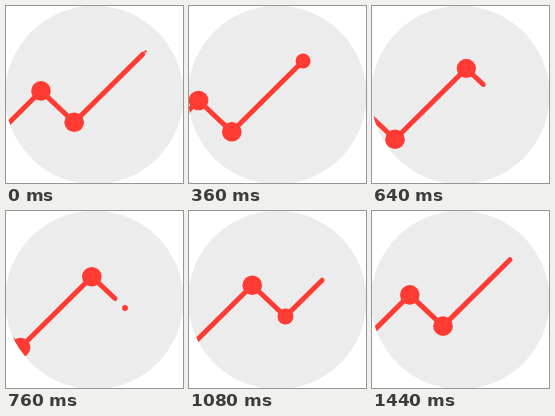
Recreate the animation shown at these times as an HTML page with a canvas. Size 177 by 177 pixels, loop 1480 ms.

```html
<!DOCTYPE html>
<html lang="en">
<head>
<meta charset="utf-8">
<title>Rolling line chart</title>
<style>
  html, body { margin: 0; width: 100%; height: 100%; overflow: hidden; background: #fff; }
  canvas { display: block; width: 177px; height: 177px; }
</style>
</head>
<body>
<canvas id="stage"></canvas>
<script>
const SIZE = 177, LOOP = 1480, STEP = 40, GROW = 800;
const PERIOD = { x: 104.5, y: -39.5 };   // from one peak to the next
const PEAK = { x: 139.5, y: 45.4 };      // newest peak when a loop starts
const VALLEY = { x: 33.2, y: 31.3 };     // valley relative to its peak
const START = { peak: -52, fall: 400, valley: 630, rise: 838 };
const DOT = 9.8, RED = '#ff3b33', GREY = '#ececec';

const canvas = document.getElementById('stage');
const ctx = canvas.getContext('2d');
const ratio = window.devicePixelRatio || 1;
canvas.width = canvas.height = Math.round(SIZE * ratio);
ctx.scale(ratio, ratio);

const add = (a, b, k = 1) => ({ x: a.x + b.x * k, y: a.y + b.y * k });

function grown(age, start) {
  const u = Math.min(1, Math.max(0, (age - start) / GROW));
  return 1 - (1 - u) ** 2;
}

function disc(p, r) {
  ctx.beginPath();
  ctx.arc(p.x, p.y, r, 0, Math.PI * 2);
}

function dot(p, amount) {
  if (amount <= 0) return;
  disc(p, DOT * amount);
  ctx.fill();
}

function line(a, b, amount) {
  if (amount <= 0) return;
  const tip = add(a, add(b, a, -1), amount);
  ctx.beginPath();
  ctx.moveTo(a.x, a.y);
  ctx.lineTo(tip.x, tip.y);
  ctx.stroke();
}

function drawCycle(age) {
  const peak = add(PEAK, PERIOD, -age / LOOP);
  const valley = add(peak, VALLEY);
  line(peak, valley, grown(age, START.fall));
  line(valley, add(peak, PERIOD), grown(age, START.rise));
  dot(peak, grown(age, START.peak));
  dot(valley, grown(age, START.valley));
}

function draw(time) {
  const t = Math.floor((time % LOOP) / STEP) * STEP;
  ctx.fillStyle = '#fff';
  ctx.fillRect(0, 0, SIZE, SIZE);
  ctx.save();
  disc({ x: 88.3, y: 89 }, 89.3);
  ctx.fillStyle = GREY;
  ctx.fill();
  ctx.clip();
  ctx.fillStyle = ctx.strokeStyle = RED;
  ctx.lineWidth = 5;
  ctx.lineCap = 'round';
  for (let n = -1; n <= 2; n++) drawCycle(t + n * LOOP);
  ctx.restore();
}

function tick() {
  draw(performance.now());
  requestAnimationFrame(tick);
}
tick();
</script>
</body>
</html>
```
